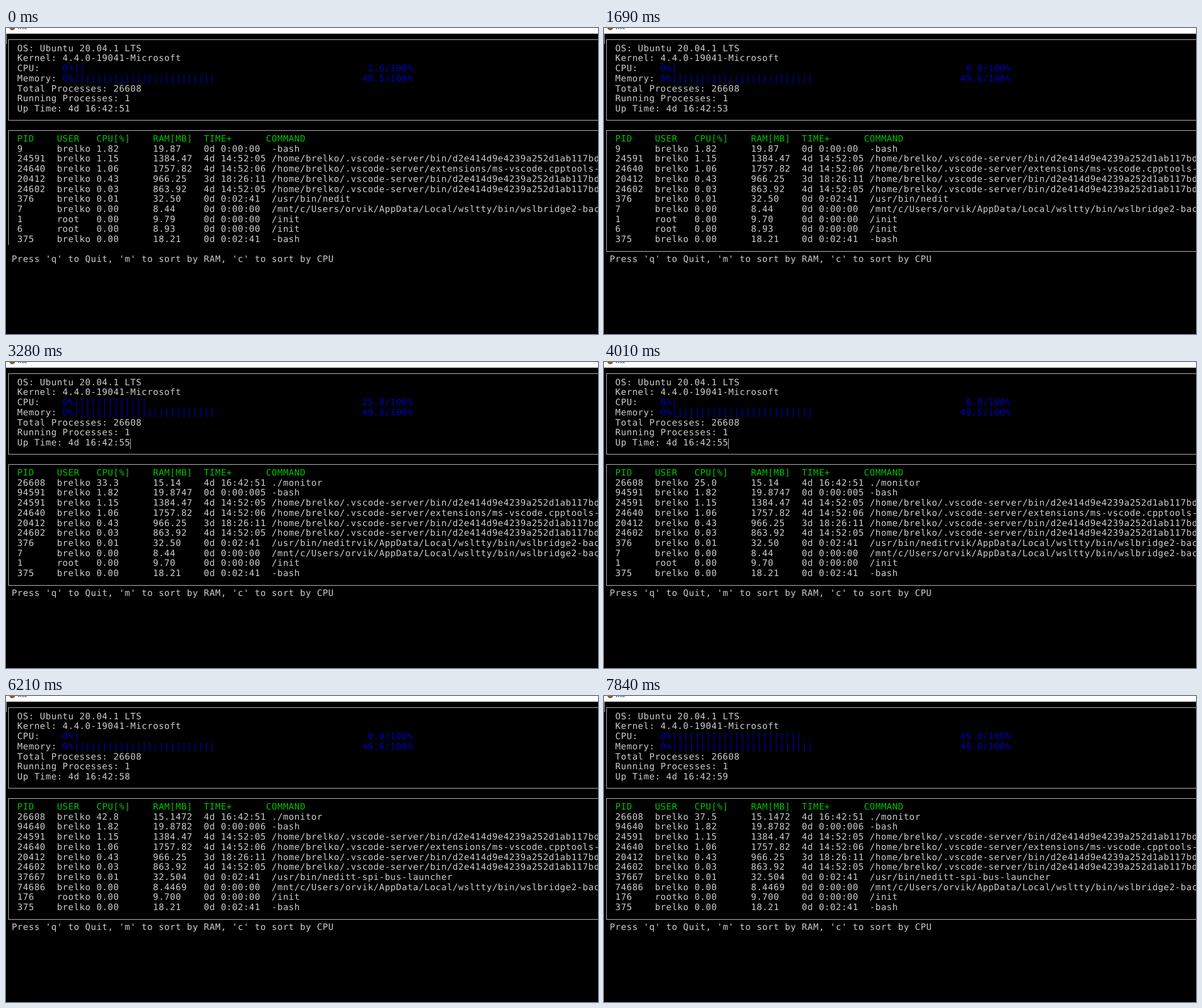
Write an HTML page that moves like this. It is 1040 px wide and 539 px high and loops after 7990 ms.

```html
<!DOCTYPE html>
<html lang="en">
<head>
<meta charset="utf-8">
<title>System monitor</title>
<style>
  html, body { margin: 0; width: 100%; height: 100%; overflow: hidden; background: #000; }
  main { position: relative; width: 100%; height: 100%; overflow: hidden; contain: strict; }
  main > * { position: absolute; box-sizing: border-box; }
  #bar { left: 0; top: 0; width: 100%; height: 10px; background: #fff; overflow: hidden; }
  #bar i { position: absolute; left: 6px; top: -6px; width: 10px; height: 10px; border-radius: 50%; background: #7a6030; }
  #bar b { position: absolute; left: 20px; top: -8px; font: 8.5px/14px "Open Sans", sans-serif; color: #111; }
  pre { margin: 0; left: 0; top: 10px; width: 100%; overflow: hidden; color: #ccc;
        font: 15.5px/17.7px "DejaVu Sans Mono", monospace; letter-spacing: 0.6px;
        font-variant-ligatures: none; text-rendering: geometricPrecision; }
  .blue { color: #0000bf; }
  .green { color: #00c400; }
  .box { left: 4px; right: 0; border: 1px solid #bfbfbf; border-right: 0; }
  #cursor { width: 1px; height: 18px; background: #bfbfbf; }
</style>
</head>
<body>
<main>
  <div id="bar"><i></i><b>WSL</b></div>
  <div class="box" style="top:20px;height:143px"></div>
  <div class="box" id="list" style="top:180px"></div>
  <pre id="screen"></pre>
  <div id="cursor"></div>
</main>
<script>
const LOOP = 7990;
const USER = 'brelko';
const home = `/home/${USER}/.vscode-server/`;
const server = home + 'bin/d2e414d9e4239a252d1ab117bd';
const tools = home + 'extensions/ms-vscode.cpptools-';
const bridge = '/mnt/c/Users/orvik/AppData/Local/wsltty/bin/wslbridge2-bac';
const launcher = '/usr/libexec/at-spi-bus-launcher';
const nedit = '/usr/bin/nedit';
const zero = '0d 0:00:00', edit = '0d 0:02:41';

// Shorter text written over longer text leaves its tail visible
const over = (a, b) => a + b.slice(a.length);
const row = (pid, cpu, ram, time, cmd, user = USER) =>
  '  ' + pid.padEnd(7) + user.padEnd(7) + cpu.padEnd(10) + ram.padEnd(9) + time.padEnd(12) + cmd;

const bash = row('9', '1.82', '19.87', zero, '-bash');
const node = row('24591', '1.15', '1384.47', '4d 14:52:05', server);
const cpp = row('24640', '1.06', '1757.82', '4d 14:52:06', tools);
const old = row('20412', '0.43', '966.25', '3d 18:26:11', server);
const idle = row('24602', '0.03', '863.92', '4d 14:52:05', server);
const editor = row('376', '0.01', '32.50', edit, nedit);
const wsl = row('7', '0.00', '8.44', zero, bridge);
const init = ram => row('1', '0.00', ram, zero, '/init', 'root');
const init6 = row('6', '0.00', '8.93', zero, '/init', 'root');
const shell = row('375', '0.00', '18.21', edit, '-bash');
const monitor = (cpu, ram) => row('26608', cpu, ram, '4d 16:42:51', './monitor');

const tail = ram => [cpp, old, idle, editor, wsl, init(ram), init6, shell];
const byCpu = cpu => [
  monitor(cpu, '15.14'), row('94591', '1.82', '19.8747', '0d 0:00:005', '-bash'),
  node, cpp, old, idle, row('376', '0.01', '32.50', edit, over(nedit, bridge)),
  wsl, init('9.70'), shell];
const byRam = [
  row('26502', '0.00', '5184.72', '4d 16:25:08', tools), cpp, node,
  row('20412', '0.43', '966.252', '3d 18:26:11', server), idle,
  row('24666', '0.00', '562.48', '4d 14:52:07', server),
  row('14667', '0.00', '390.84', '2d 4:12:05', launcher),
  row('14686', '0.00', '242.69', '2d 4:12:05', over('/usr/libexec/at-spi2-registryd', bridge)),
  editor, row('975', '1.82', '19.87', zero, '-bash')];
const resorted = cpu => [
  monitor(cpu, '15.1472'), row('94640', '1.82', '19.8782', '0d 0:00:006', '-bash'),
  node, cpp, old, idle, row('37667', '0.01', '32.504', edit, over(nedit, launcher)),
  row('74686', '0.00', '8.4469', zero, bridge),
  row('176', '0.00', '9.700', zero, '/init', over('root', USER)), shell];

const tables = [
  [0, [bash, node, ...tail('9.79')]],
  [120, [bash, node, ...tail('9.70')]],
  [2700, [monitor('33.3', '15.14'), row('94591', '1.82', '19.8747', '0d 0::52:05', server), ...tail('9.70')]],
  [2850, byCpu('33.3')],
  [3580, byCpu('25.0')],
  [4170, byRam],
  [5535, resorted('42.8')],
  [7107, resorted('37.5')]];

// Bursts of refreshes: first time, last time, CPU load per refresh, cursor ends after the clock
const bursts = [
  [0, 0, [2.6]],
  [120, 1130, [0, 14.3, 0, 33.3, 0, 5.7, 50, 0], true],
  [1290, 1290, [0]],
  [2270, 2700, [33.3, 0, 16.7, 57.1]],
  [2850, 2850, [0]],
  [3150, 4010, [25, 0, 42.9, 0, 12.5, 50, 0], true],
  [4170, 5260, [33.3, 0, 20, 0, 45, 0, 28.6, 11.4], true],
  [5400, 6210, [0, 40, 0, 14.3, 50, 0, 0]],
  [6370, 7550, [25, 0, 42.9, 11.1, 0, 37.5, 0, 20, 0]],
  [7840, 7840, [45]]];
const steps = bursts.flatMap(([from, to, loads, atClock]) => loads.map((cpu, i) => {
  const last = loads.length - 1;
  const odd = (last - i) % 2 === 1;
  return [from + (to - from) * i / Math.max(1, last), { cpu, away: atClock ? !odd : odd }];
}));

const at = (list, t) => list.findLast(([start]) => start <= t);
const meter = load => {
  const value = load.toFixed(1) + '/100%';
  const bars = '0%' + '|'.repeat(load / 2 + 1);
  return `<span class="blue">${bars.padEnd(62 - value.length)}${value}</span>`;
};

const $ = id => document.getElementById(id);
let shown;

function draw(t) {
  const [time, { cpu, away }] = at(steps, t);
  const seconds = 51 + Math.floor((time + 880) / 1000);
  const memory = t >= 4170 || (t >= 1690 && t < 1990) ? 49.6 : 49.5;
  const html = [
    ' ',
    '  OS: Ubuntu 20.04.1 LTS',
    '  Kernel: 4.4.0-19041-Microsoft',
    '  CPU:    ' + meter(cpu),
    '  Memory: ' + meter(memory),
    '  Total Processes: 26608',
    '  Running Processes: 1',
    '  Up Time: 4d 16:42:' + seconds,
    '', '',
    '<span class="green">  PID    USER   CPU[%]    RAM[MB]  TIME+      COMMAND</span>',
    ...at(tables, t)[1],
    '',
    " Press 'q' to Quit, 'm' to sort by RAM, 'c' to sort by CPU"
  ].join('\n');
  if (html !== shown) $('screen').innerHTML = shown = html;

  const partial = t < 120;
  $('list').style.height = partial ? '202px' : '214px';
  $('list').style.borderBottomWidth = partial ? 0 : '1px';
  $('cursor').style.left = away ? '218px' : 0;
  $('cursor').style.top = away ? '135px' : '10px';
}

const begin = performance.now();
function tick() {
  draw((performance.now() - begin) % LOOP);
  requestAnimationFrame(tick);
}
tick();
</script>
</body>
</html>
```
